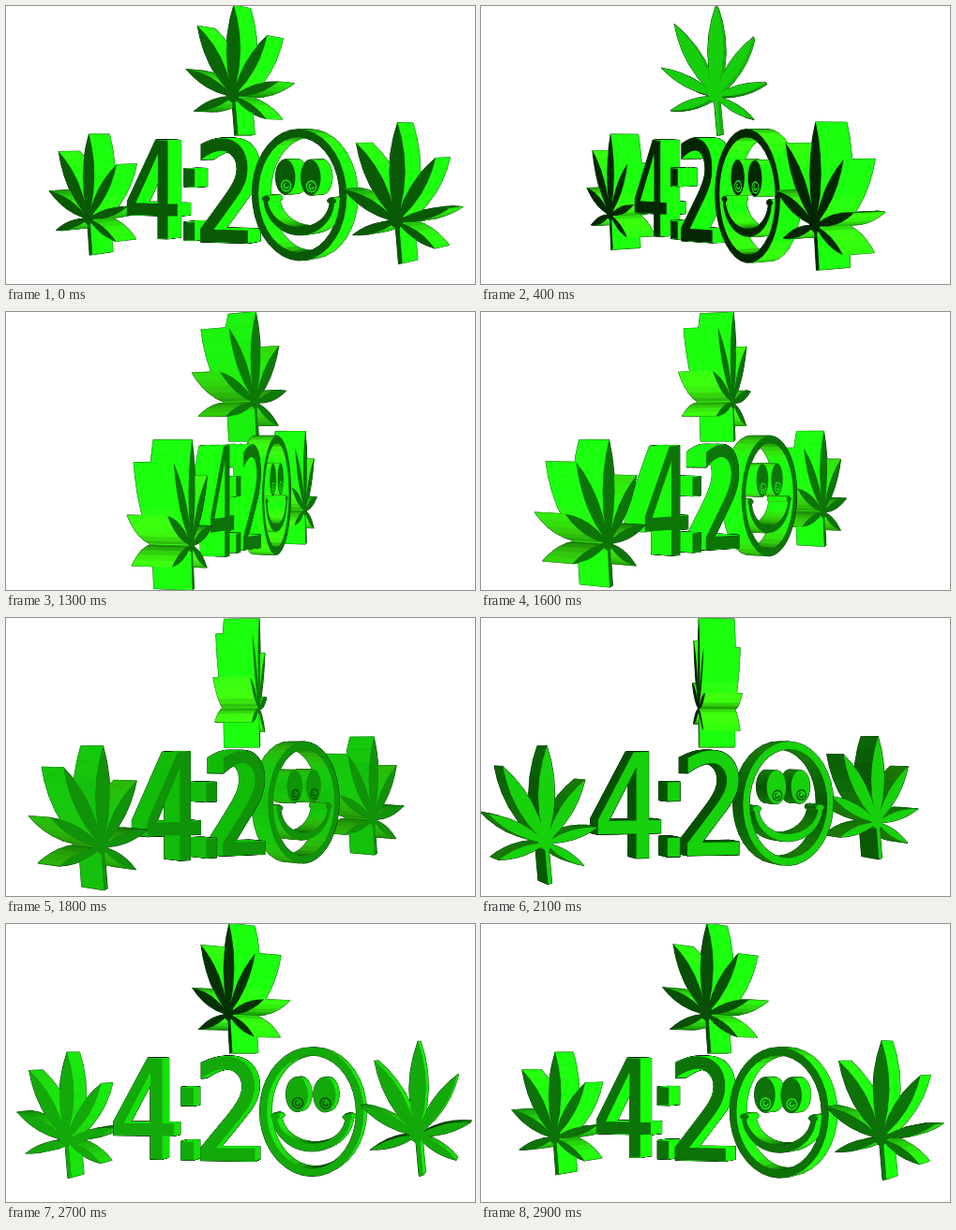
An HTML page with a canvas that plays this animation: 500x297 px, repeating every 3000 ms.

```html
<!DOCTYPE html>
<html lang="en">
<head>
<meta charset="utf-8">
<title>4:20</title>
<style>
  html, body { margin: 0; width: 100%; height: 100%; overflow: hidden; background: #fff; }
  canvas { display: block; }
</style>
</head>
<body>
<canvas id="stage" width="500" height="297"></canvas>
<script>
const ctx = document.getElementById('stage').getContext('2d');
const HORIZON = 139, FOCAL = 1250, OUTLINE = '#032a03';

// Model axes: u to the right, v down, w towards the viewer.
function project(u, v, w, view) {
  const x = u * view.cos - w * view.sin;
  const s = FOCAL / (FOCAL - u * view.sin - w * view.cos);
  return { x: view.pivot + x * s, y: HORIZON + v * s, s, offset: x };
}

// Local affine version of the projection, for text and line details.
function place(u, v, w, view) {
  const p = project(u, v, w, view), k = p.s * p.s * view.sin / FOCAL;
  ctx.setTransform(p.s * view.cos + p.offset * k, v * k, 0, p.s, p.x, p.y);
}

const clamp = n => Math.max(0, Math.min(1, n));
const green = (level, red = 0) =>
  `rgb(${Math.round(level * .11 + red)},${Math.round(level)},${Math.round(level * .06)})`;

function faceLevel({ angle, sin }) {
  const lit = Math.max(0, Math.cos(angle + .17)) ** 4.6;
  return 35 + 195 * lit + (angle < 0 ? 90 * sin ** 4 : 0);
}

function sideColor(nu, nv, view) {
  const nx = nu * view.cos, nz = nu * view.sin;
  const light = clamp(1.6 * nz + .5 * nx + .3 * Math.abs(nv));
  const glow = 190 * Math.max(0, Math.abs(nv) - .5) * Math.max(0, nz);
  return green(50 + 205 * light, glow);
}

function ellipse(cx, cy, rx, ry, reverse = false, from = 0, to = 2 * Math.PI, n = 36) {
  const points = [];
  for (let i = 0; i <= n; i++) {
    const a = from + (to - from) * i / n;
    points.push([cx + rx * Math.cos(a), cy + ry * Math.sin(a)]);
  }
  return reverse ? points.reverse() : points;
}

function leaf(cu, cv) {
  const tips = [[-47, 15], [-57, -30], [-43, -76], [1, -96], [40, -62], [53, -14], [39, 24]];
  const points = [];
  for (const [x, y] of tips) {
    const rim = (t, side) => {
      const h = side * .35 * t * (1 - t);
      points.push([cu + x * t - y * h, cv + y * t + x * h]);
    };
    for (const t of [.13, .3, .5, .68, .85, 1]) rim(t, -1);
    for (const t of [.85, .68, .5, .3, .13]) rim(t, 1);
  }
  points.push([cu + 3, cv + 7], [cu + 6, cv + 40], [cu + 2, cv + 41], [cu - 1, cv + 7]);
  return { u: cu, contours: [points], front: 19, back: -19 };
}

const smiley = {
  u: 80, front: 17, back: -9, eyes: true,
  contours: [
    ellipse(80, 60, 54.5, 67),
    ellipse(80, 60, 47, 59, true),
    ellipse(65, 42, 11.5, 18),
    ellipse(94, 42, 11.5, 18),
    [...ellipse(80, 64, 41, 37, false, 0, Math.PI), ...ellipse(80, 64, 36, 29, true, 0, Math.PI)],
    ellipse(42, 65, 5, 3),
    ellipse(118, 65, 5, 3)
  ]
};
const glyph = (text, u) => ({ text, u, front: 17, back: -9 });

const row = [leaf(-189, 94), glyph('4', -101), glyph(':', -53), glyph('2', -7), smiley, leaf(189, 83)];
const topLeaf = leaf(0, -42);

function trace(points) {
  points.forEach((p, i) => i ? ctx.lineTo(p.x, p.y) : ctx.moveTo(p.x, p.y));
  ctx.closePath();
}

function outline(points, color, width) {
  ctx.beginPath();
  trace(points);
  ctx.strokeStyle = color;
  ctx.lineWidth = width;
  ctx.stroke();
}

function drawSolid({ contours, front, back, eyes, u }, view) {
  const quads = [], faces = [];
  for (const contour of contours) {
    const near = contour.map(([u, v]) => project(u, v, front, view));
    const far = contour.map(([u, v]) => project(u, v, back, view));
    faces.push(near);
    contour.forEach((p, i) => {
      const j = (i + 1) % contour.length, q = contour[j];
      const du = q[0] - p[0], dv = q[1] - p[1], length = Math.hypot(du, dv);
      const [a, b, c] = [near[i], near[j], far[j]];
      const turn = (b.x - a.x) * (c.y - b.y) - (b.y - a.y) * (c.x - b.x);
      if (length < .01 || turn >= 0) return;
      quads.push({
        points: [a, b, c, far[i]],
        depth: (p[0] + q[0]) * view.sin,
        color: sideColor(dv / length, -du / length, view)
      });
    });
  }
  quads.sort((a, b) => a.depth - b.depth);
  for (const q of quads) outline(q.points, OUTLINE, 1.2);
  for (const f of faces) outline(f, OUTLINE, 1);
  for (const q of quads) {
    outline(q.points, q.color, .7);
    ctx.fillStyle = q.color;
    ctx.fill();
  }

  const level = faceLevel(view);
  ctx.beginPath();
  faces.forEach(trace);
  ctx.fillStyle = green(level);
  ctx.fill();

  if (eyes) {
    place(u, 60, front, view);
    ctx.strokeStyle = level > 140 ? '#064d06' : green(240);
    ctx.lineWidth = 1.4;
    for (const x of [-14, 15]) {
      ctx.beginPath();
      ctx.arc(x, -9, 5.5, 0, 2 * Math.PI);
      ctx.moveTo(x + 2.5, -9);
      ctx.arc(x, -9, 2.5, 0, 4.5);
      ctx.stroke();
    }
    ctx.resetTransform();
  }
}

function drawGlyph({ text, u, front, back }, view) {
  ctx.font = '147px "DejaVu Sans", sans-serif';
  ctx.textAlign = 'center';
  ctx.lineJoin = 'miter';
  const layer = (w, method) => {
    place(u, 60, w, view);
    ctx.scale(.85, 1);
    ctx[method](text, 0, 52);
  };
  ctx.strokeStyle = OUTLINE;
  ctx.lineWidth = 2.4;
  for (let w = back; w <= front; w++) layer(w, 'strokeText');
  ctx.strokeStyle = ctx.fillStyle = sideColor(Math.sign(view.sin), 0, view);
  ctx.lineWidth = 1.2;
  for (let w = back; w < front; w += .5) {
    layer(w, 'strokeText');
    layer(w, 'fillText');
  }
  ctx.strokeStyle = ctx.fillStyle = green(faceLevel(view));
  layer(front, 'strokeText');
  layer(front, 'fillText');
  ctx.resetTransform();
  ctx.lineJoin = 'round';
}

// Every half turn shows the same front again.
function makeView(degrees, pivot) {
  const wrapped = ((degrees + 90) % 180 + 180) % 180 - 90;
  const angle = wrapped * Math.PI / 180;
  return { angle, pivot, sin: Math.sin(angle), cos: Math.cos(angle) };
}

function draw() {
  const step = Math.floor(performance.now() / 100) % 30;
  const rowView = makeView(31 + 6 * step, 249);
  ctx.fillStyle = '#fff';
  ctx.fillRect(0, 0, 500, 297);
  ctx.lineJoin = 'round';
  drawSolid(topLeaf, makeView(28 - 6 * step, 251));
  [...row].sort((a, b) => (a.u - b.u) * rowView.sin)
    .forEach(part => (part.text ? drawGlyph : drawSolid)(part, rowView));
  requestAnimationFrame(draw);
}
draw();
</script>
</body>
</html>
```
